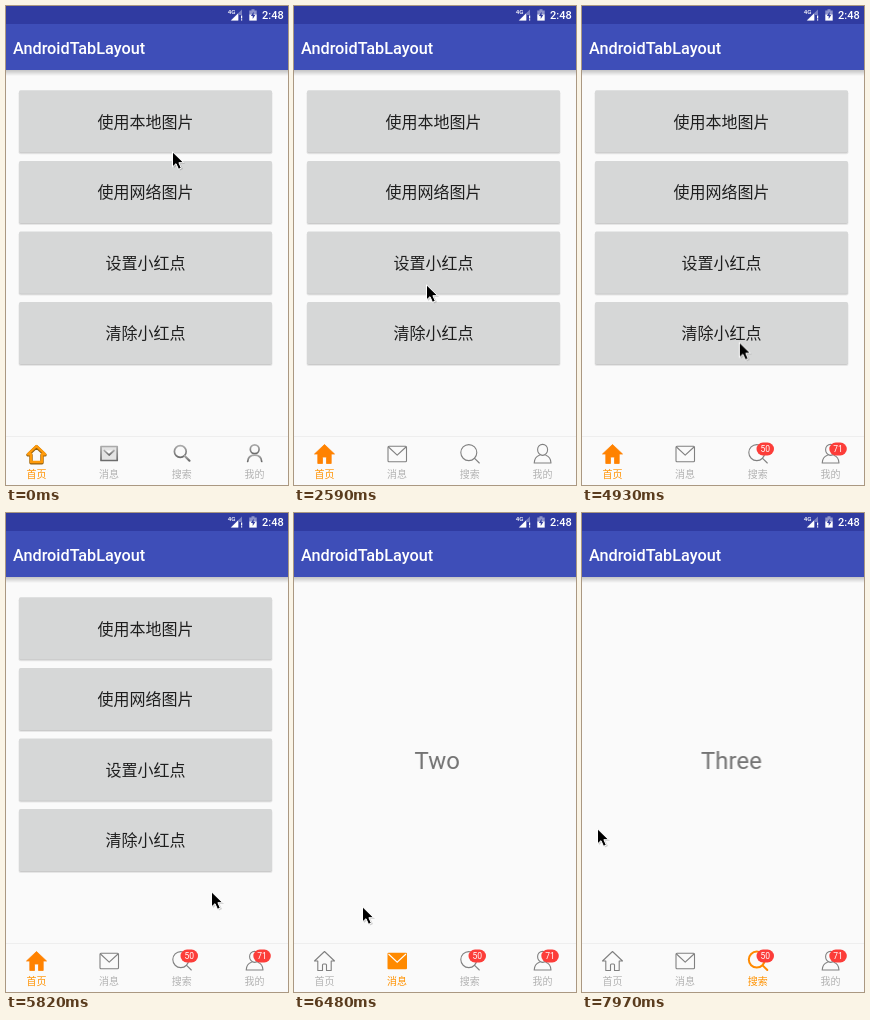
These frames come from a looping animation (282 by 479 pixels, 7990 ms). An HTML page:

```html
<!DOCTYPE html>
<html lang="zh-CN">
<head>
<meta charset="utf-8">
<title>AndroidTabLayout</title>
<style>
  html, body { margin: 0; width: 100%; height: 100%; overflow: hidden; background: #fafafa; }
  svg { display: block; width: 282px; height: 479px; }
  text { font-family: Roboto, "Noto Sans CJK SC", "Noto Sans CJK", sans-serif; }
  .bar { font-weight: 500; fill: #fff; }
  .button { font-size: 16px; fill: #1e1e1e; text-anchor: middle; }
  .page { font-size: 24px; fill: #737373; text-anchor: middle; }
  .label { font-size: 10px; fill: #b2b2b2; text-anchor: middle; }
  .label.hot { fill: #ff9200; font-weight: 500; }
  .count { font-size: 8.5px; fill: #fff; text-anchor: middle; }
  .thin { fill: none; stroke: #808080; stroke-width: 1.1; stroke-linejoin: round; stroke-linecap: round; }
  .bevel { fill: none; stroke: url(#steel); stroke-width: 1.7; stroke-linejoin: round; stroke-linecap: round; }

  .old, .new, .until-two, .from-two, .only-two, .not-two,
  .until-three, .from-three, .badge-a, .badge-b {
    animation: 7.99s step-end infinite;
  }
  .old { animation-name: old; }
  .new { animation-name: new; }
  .until-two { animation-name: until-two; }
  .from-two { animation-name: from-two; }
  .only-two { animation-name: only-two; }
  .not-two { animation-name: not-two; }
  .until-three { animation-name: until-three; }
  .from-three { animation-name: from-three; }
  .badge-a { animation-name: badge-a; }
  .badge-b { animation-name: badge-b; }
  #pages { animation: swipe 7.99s linear infinite; }
  #cursor { animation: point 7.99s ease-in-out infinite; }

  @keyframes old { 0% { opacity: 1 } 14.39%, to { opacity: 0 } }
  @keyframes new { 0% { opacity: 0 } 14.39%, to { opacity: 1 } }
  @keyframes until-two { 0% { opacity: 1 } 77.97%, to { opacity: 0 } }
  @keyframes from-two { 0% { opacity: 0 } 77.97%, to { opacity: 1 } }
  @keyframes only-two { 0% { opacity: 0 } 77.97% { opacity: 1 } 96.75%, to { opacity: 0 } }
  @keyframes not-two { 0% { opacity: 1 } 77.97% { opacity: 0 } 96.75%, to { opacity: 1 } }
  @keyframes until-three { 0% { opacity: 1 } 96.75%, to { opacity: 0 } }
  @keyframes from-three { 0% { opacity: 0 } 96.75%, to { opacity: 1 } }
  @keyframes badge-a { 0% { opacity: 0 } 39.17%, to { opacity: 1 } }
  @keyframes badge-b { 0% { opacity: 0 } 48.75%, to { opacity: 1 } }

  @keyframes swipe {
    0%, 73.09% { transform: translateX(0) }
    76.85% { transform: translateX(-100px) }
    77.97% { transform: translateX(-136px); animation-timing-function: cubic-bezier(.22, 1, .36, 1) }
    83.35%, 93.37% { transform: translateX(-291px) }
    96.75% { transform: translateX(-469px); animation-timing-function: cubic-bezier(.2, .7, .5, 1) }
    99.75% { transform: translateX(-572.5px) }
    to { transform: translateX(-574px) }
  }
  @keyframes point {
    0%, .375% { transform: translate(166px, 145px) }
    7.26%, 26.41% { transform: translate(130.5px, 188px) }
    30.79% { transform: translate(131px, 289.5px) }
    32.42% { transform: translate(132px, 278px) }
    35.04%, 54.82% { transform: translate(131.5px, 260px) }
    57.2%, 59.32% { transform: translate(147.5px, 311px) }
    61.95%, 63.83% { transform: translate(157px, 336px) }
    70.09% { transform: translate(205px, 387px) }
    72.84%, 73.09% { transform: translate(205px, 378px); animation-timing-function: linear }
    76.85% { transform: translate(103px, 389px); animation-timing-function: linear }
    77.97%, 84.23% { transform: translate(68px, 393px) }
    87.23% { transform: translate(120px, 389px) }
    91.36%, 93.37% { transform: translate(228px, 403px); animation-timing-function: linear }
    96.75% { transform: translate(50px, 340px); animation-timing-function: ease-out }
    98.87%, to { transform: translate(15px, 315px) }
  }
</style>
</head>
<body>
<svg viewBox="0 0 282 479">
  <defs>
    <linearGradient id="shade" x2="0" y2="1">
      <stop stop-opacity=".22"/><stop offset="1" stop-opacity="0"/>
    </linearGradient>
    <linearGradient id="steel" x2="0" y2="1">
      <stop stop-color="#aaa"/><stop offset="1" stop-color="#6c6c6c"/>
    </linearGradient>
    <g id="plate">
      <rect x="12.500" y="1" width="254" height="63" rx="2" fill="#000" opacity=".08"/>
      <rect x="13" y="1" width="253" height="62" rx="2" fill="#000" opacity=".12"/>
      <rect x="13" width="253" height="62" rx="1.500" fill="#d6d7d7"/>
    </g>
    <path id="house" d="M30.500 438.500 20.500 448H23.800V457.500H28.500V452Q28.500 451 29.500 451H31.500Q32.500 451 32.500 452V457.500H37.200V448H40.500Z"/>
    <path id="hut" d="M30.500 440 22 448.200H25V456H36V448.200H39Z"/>
    <path id="flap" d="M94.500 441 103.200 449.200 112 441"/>
    <g id="lens"><circle cx="174.800" cy="446.600" r="8"/><path d="M180.600 452.400 185.300 457"/></g>
    <g id="person">
      <path d="M248.600 438.400a5 5.200 0 0 1 5 5.400c0 3-2.200 5.600-5 5.600s-5-2.600-5-5.600a5 5.200 0 0 1 5-5.400Z"/>
      <path d="M245.400 449.200C242 450.300 240.400 453 240.200 457H257C256.800 453 255.200 450.300 251.800 449.200"/>
    </g>
    <rect id="pill" y="436.500" width="17.500" height="13" rx="6.500" fill="#fc3d39"/>
  </defs>

  <rect width="282" height="479" fill="#fafafa"/>

  <g id="pages">
    <use href="#plate" y="84.300"/>
    <use href="#plate" y="155"/>
    <use href="#plate" y="225.500"/>
    <use href="#plate" y="296"/>
    <g class="button">
      <text x="139.500" y="121.700">使用本地图片</text>
      <text x="139.500" y="192">使用网络图片</text>
      <text x="139.500" y="262.700">设置小红点</text>
      <text x="139.500" y="333">清除小红点</text>
    </g>
    <text class="page" x="431.300" y="256">Two</text>
    <text class="page" x="722" y="256">Three</text>
  </g>

  <rect width="282" height="18" fill="#303ba1"/>
  <rect y="18" width="282" height="46" fill="#3e4eb8"/>
  <rect y="64" width="282" height="6" fill="url(#shade)"/>
  <text class="bar" x="7" y="47.700" font-size="16.250">AndroidTabLayout</text>
  <text class="bar" x="256" y="13.300" font-size="11">2:48</text>
  <text class="bar" x="221.800" y="8.300" font-size="6.200">4G</text>
  <path d="M236 3.500V9H233V14.500H224.500Z" fill="#fff" opacity=".35"/>
  <path d="M232 7.500V14.500H225Z" fill="#fff"/>
  <path d="M235 9.500h1.200v3H235zM235 13.300h1.200v1.200H235z" fill="#fff"/>
  <path d="M245.500 3.200h3v1.200h2.200v4h-7.400v-4h2.200z" fill="#fff" opacity=".45"/>
  <path d="M243.300 8.400h7.400v6.200h-7.400z" fill="#fff"/>
  <path d="M247.600 5.800 244.900 10H246.700V13L249.300 8.900H247.600Z" fill="#303ba1"/>

  <rect y="430" width="282" height="49" fill="#fafafa"/>
  <rect y="430" width="282" height="1" fill="#eee"/>

  <g class="old">
    <g fill="none" stroke-linejoin="round">
      <use href="#hut" y=".700" stroke="#94600f" stroke-width="3.400"/>
      <use href="#hut" stroke="#ff9a0a" stroke-width="2.400"/>
    </g>
    <g class="bevel">
      <rect x="95" y="440.500" width="16.200" height="14" fill="#e4e4e4"/>
      <path d="M98.300 444.500 103.100 449 108 444.500" fill="#fafafa"/>
      <circle cx="174.300" cy="445.500" r="5.900"/>
      <path d="M178.800 450 183.500 454.700" stroke-width="2.200"/>
      <circle cx="248.700" cy="443.200" r="4.400"/>
      <path d="M241.700 455.500C242 451.500 244.500 449.200 248.700 449.200S255.400 451.500 255.700 455.500"/>
    </g>
  </g>

  <g class="new">
    <use class="until-two" href="#house" fill="#ff8200" stroke="#ff8200" stroke-width=".800" stroke-linejoin="round"/>
    <g class="from-two"><use class="thin" href="#house"/></g>
    <g class="not-two">
      <rect class="thin" x="94" y="440.200" width="18.500" height="15.600" rx="1"/>
      <use class="thin" href="#flap"/>
    </g>
    <g class="only-two">
      <rect x="93.500" y="439.700" width="19.500" height="16.600" rx="1" fill="#ff8a00"/>
      <use href="#flap" fill="none" stroke="#fff" stroke-width="1.100"/>
    </g>
    <g class="until-three"><use class="thin" href="#lens"/></g>
    <use class="from-three" href="#lens" fill="none" stroke="#ff8a00" stroke-width="2" stroke-linecap="round"/>
    <use class="thin" href="#person"/>
  </g>

  <g class="until-two"><text class="label hot" x="30.500" y="472">首页</text></g>
  <g class="from-two"><text class="label" x="30.500" y="472">首页</text></g>
  <g class="only-two"><text class="label hot" x="103" y="472">消息</text></g>
  <g class="not-two"><text class="label" x="103" y="472">消息</text></g>
  <g class="from-three"><text class="label hot" x="175.800" y="472">搜索</text></g>
  <g class="until-three"><text class="label" x="175.800" y="472">搜索</text></g>
  <text class="label" x="248.600" y="472">我的</text>

  <g class="badge-a">
    <use href="#pill" x="174.500"/>
    <text class="count" x="183.200" y="446">50</text>
  </g>
  <g class="badge-b">
    <use href="#pill" x="247.300"/>
    <text class="count" x="256" y="446">71</text>
  </g>

  <g id="cursor">
    <path d="M2 2.500V17L5.500 14 8 19.500 11 18 8.500 13H13Z" fill="#000" opacity=".16"/>
    <path d="M.500 .800V15.900L4 12.700 6.500 18.300 9.300 17.100 6.900 11.700H11.600Z" stroke="#fff" stroke-linejoin="round"/>
  </g>
</svg>
</body>
</html>
```
